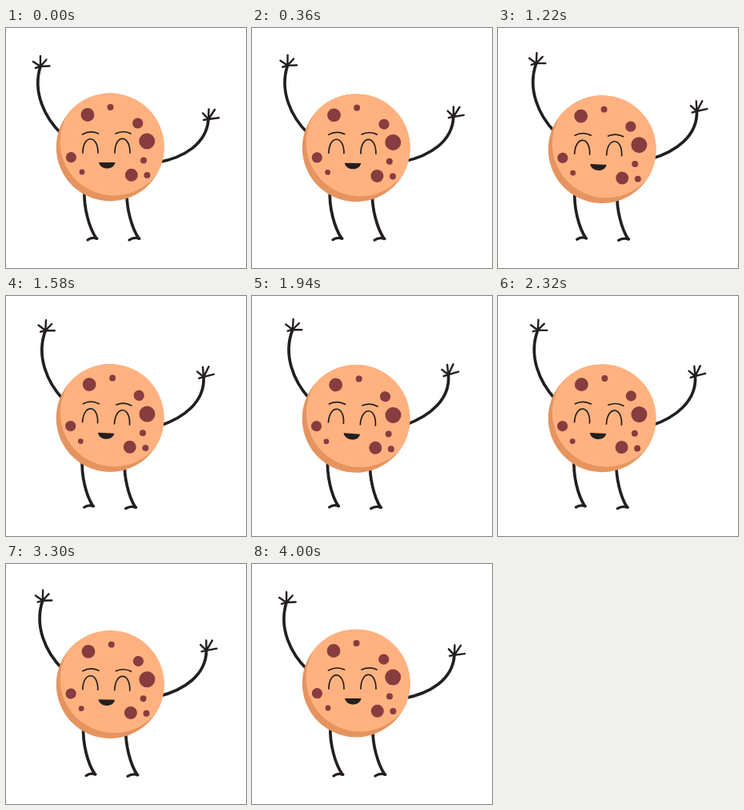
Write an HTML page that moves like this. It is 300 by 300 pixels and loops after 4.02 s.

```html
<!DOCTYPE html>
<html lang="en">
<head>
<meta charset="utf-8">
<title>Waving cookie</title>
<style>
html, body { margin: 0; height: 100%; overflow: hidden; background: #fff; }
svg { display: block; width: 100%; height: 100%; }
.line { fill: none; stroke: #231f20; stroke-linecap: round; stroke-linejoin: round; }
.limb { stroke-width: 3.7; }
.finger { stroke-width: 2.4; }
.face { stroke-width: 1.7; }
</style>
</head>
<body>
<svg viewBox="0 0 300 300">
  <clipPath id="disc"><circle cx="130.2" cy="149" r="67.4"/></clipPath>

  <g id="legs" class="line limb">
    <path d="M98 203C97 225 104 250 113 263M151 208C151 226 157 250 166 263"/>
    <path d="M102 265Q107 261 114 263.3M154 265Q160 261 167 263.3" stroke-width="3.2"/>
  </g>
  <g id="leftArm" class="line">
    <path class="limb" d="M70 133C48 112 33 80 43 48"/>
    <path class="finger" d="M34 42L43 48L43 35M50.5 39.5L43 48L54.5 47.5M43 48L37 50"/>
  </g>
  <g id="rightArm" class="line">
    <path class="limb" d="M190 168C222 162 251 145 253 114"/>
    <path class="finger" d="M246 106.5L253 114L253.5 101.5M261 102L253 114L266 112.3M253 114L247 115"/>
  </g>

  <g id="body">
    <circle cx="130.2" cy="149" r="67.4" fill="#e6945f"/>
    <circle cx="135" cy="142" r="67.4" fill="#ffb27f" clip-path="url(#disc)"/>
    <g id="chips" fill="#873c3f"></g>
    <path class="line face" d="M95.5 133Q105 127.5 115.5 132M137 132Q147 127.5 156 132"/>
    <path class="line face" d="M96 156C96 133 115 133 115 156M136 156C136 132.5 155 132.5 155 156"/>
    <path d="M116 168H136.5C135 178 118 178 116 168Z" fill="#231f20"/>
  </g>
</svg>
<script>
const LOOP = 4020;
const el = id => document.getElementById(id);

// x, y, radius
const chips = [
  [102, 108.5, 8.4], [130.5, 99, 4], [164.7, 119, 6.6],
  [176.2, 141.5, 10], [172, 165.5, 4], [156.8, 183.8, 8],
  [176.4, 184, 4], [81.4, 161.7, 6.6], [95, 180, 3.4]
];
el('chips').innerHTML = chips
  .map(([x, y, r]) => `<circle cx="${x}" cy="${y}" r="${r}"/>`).join('');

// degrees at full sway, pivot x, pivot y
const sway = {
  body: [4, 66, 149],
  legs: [2, 130, 106],
  leftArm: [4, 136, 160],
  rightArm: [-9, 146, 156]
};

function draw(now) {
  const phase = (now % LOOP) / LOOP;
  const amount = 1 - Math.abs(1 - 2 * phase);
  for (const [id, [angle, x, y]] of Object.entries(sway))
    el(id).setAttribute('transform', `rotate(${angle * amount} ${x} ${y})`);
}

const start = performance.now();
function tick() {
  draw(performance.now() - start);
  requestAnimationFrame(tick);
}
tick();
</script>
</body>
</html>
```
